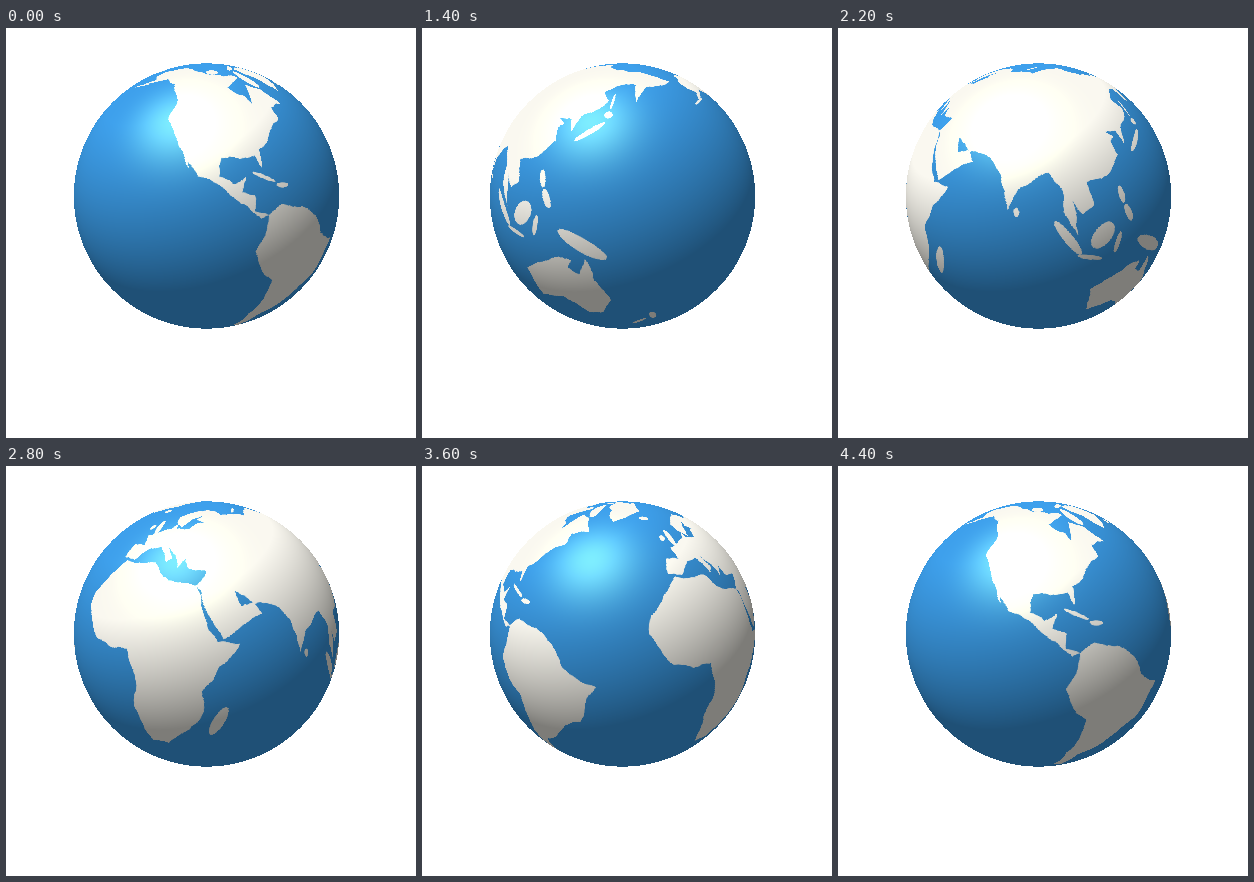
An HTML page with a canvas that plays this animation: 410 by 410 pixels, repeating every 4.5 s.

```html
<!DOCTYPE html>
<html lang="en">
<head>
<meta charset="utf-8">
<title>Turning globe</title>
<style>
html, body { margin: 0; width: 100%; height: 100%; overflow: hidden; background: #fff }
canvas { display: block }
</style>
</head>
<body>
<canvas id="stage" width="410" height="410"></canvas>
<script>
const RAD = Math.PI / 180;

// Flat map, four cells per degree; the land is slightly narrowed about longitude 0
const W = 1440, H = 720, NARROW = .97;
const mapX = lon => (lon * NARROW + 180) * 4;
const mapY = lat => (90 - lat) * 4;
const lands = new Path2D();

let seed = 7;
const random = () => (seed = seed * 16807 % 2147483647) / 2147483647;

// Rough line from a to b: each midpoint is pushed sideways a little
function shore(a, b, depth = 3) {
  if (!depth) return lands.lineTo(...b);
  const push = (random() - .5) * .16;
  const mid = [(a[0] + b[0]) / 2 + (b[1] - a[1]) * push, (a[1] + b[1]) / 2 - (b[0] - a[0]) * push];
  shore(a, mid, depth - 1);
  shore(mid, b, depth - 1);
}

// Capes and bays as longitude, latitude pairs
function continent(...keys) {
  const points = [];
  for (let i = 0; i < keys.length; i += 2) points.push([mapX(keys[i]), mapY(keys[i + 1])]);
  lands.moveTo(...points[0]);
  points.forEach((p, i) => shore(p, points[(i + 1) % points.length]));
  lands.closePath();
}

// Island as a tilted ellipse, sizes in degrees
function island(lon, lat, long, wide, angle) {
  const part = new Path2D();
  part.ellipse(mapX(lon), mapY(lat), long * 4, wide * 4, -angle * RAD, 0, 7);
  lands.addPath(part);
}

// North America
continent(-168,65.6, -156,71.3, -128,70, -96,68, -85,69.5, -81,68, -94,60, -82,55, -79,51.3,
  -78,59, -77.5,62.4, -65,60, -55.8,52.3, -66.5,50.2, -65,45, -70.5,42, -76,35, -81,31.7,
  -80.4,25.2, -83,29.5, -97.3,27.8, -97.5,21, -91.5,18.6, -87,21.5, -88.5,16, -83.3,15,
  -83,9.5, -77.4,8.3, -80.3,7.2, -86,11.5, -94,16, -105.5,20.5, -114,31.5, -109.5,23.1,
  -117,33, -124.2,40.3, -123.5,48.5, -135,58.5, -146,60.8, -164.5,54.7, -158,58.6, -165.5,61.5);
// South America
continent(-77.4,8.3, -72,12, -62,10.7, -51.5,4.2, -48.5,-1, -35.2,-6, -39,-14, -41,-22,
  -48.5,-26, -57,-36, -65,-41, -68,-51, -66,-55, -74,-52, -73,-38, -70.3,-18, -76,-14,
  -81.2,-5, -78,2);
// Europe and Asia
continent(-9,37, -8.8,43.2, -1.5,43.5, -4.7,48.4, 8,54, 10,57.5, 11,54.2, 20,55, 23.5,59.5,
  29,60, 21.4,61.5, 25,65.5, 17.5,61.5, 14,55.5, 8,58.1, 5.2,62, 14.5,68, 26,71.1, 41,67,
  35,64.5, 44,68, 68,68.5, 73,72, 104,77.6, 140,72.5, 180,69, 190,66, 179,62.5, 163,59.5,
  156.7,51, 156,61, 142,59.2, 135.3,54.7, 140.5,50, 129,41, 127.5,34.5, 125,39.6, 118,39,
  122,37, 119.5,35, 122,30, 116,23, 106,20, 109.2,12, 105,8.7, 100.5,13.5, 103.8,1.4,
  98.4,8.3, 97,16.5, 91,22.5, 80.3,15.5, 77.6,8.1, 72.8,20, 67,25, 57,25.8, 48.5,30,
  51.5,24.5, 56.3,26, 59.8,22.4, 45,12.8, 34.9,29, 32.5,30.5, 36,36.5, 27.5,36.8, 25,40.5,
  22.5,36.5, 19.4,41.5, 13,45.5, 18,40, 16,38, 9,44.4, 3,42.5, -2,36.8);
// Africa
continent(-5.9,35.8, -17,21, -17.4,14.7, -7.5,4.4, 9,4.2, 13.8,-10.5, 12,-18, 18.2,-34.4,
  26,-34, 35.5,-24, 40.5,-15, 39,-6.5, 51.3,11.5, 43,11.5, 37,20, 32.5,30.5, 20,31, 10.8,37);
// Australia
continent(114,-22, 131,-12.2, 136.8,-12.2, 135.5,-15.5, 140.5,-17.6, 142.5,-10.7, 146,-19,
  153.5,-28.5, 150,-37.5, 143,-39, 137,-34, 131,-31.5, 118,-35);
// Greenland
continent(-73,78, -32,83.5, -22,71, -43.5,60, -54,69);

island(46.8, -19, 7, 2.2, 72);        // Madagascar
island(80.8, 7.5, 1.5, .9, -80);      // Sri Lanka
island(100.5, -.2, 8, 1.6, -47);      // Sumatra
island(110, -7.3, 5, .8, -8);         // Java
island(114, 1, 5.5, 3.6, 50);         // Borneo
island(121, -2, 4, 1, 80);            // Sulawesi
island(141, -5.3, 10, 2.6, -22);      // New Guinea
island(121.5, 15.5, 3.2, 1.2, -70);   // Luzon
island(125, 8.8, 3.5, 1.4, -60);      // Mindanao
island(136.5, 35.5, 7, 1.1, 38);      // Honshu
island(143, 43.4, 2, 1.4, 0);         // Hokkaido
island(143, 50, 4, .6, 90);           // Sakhalin
island(176, -38.5, 3.5, 1.4, -50);    // New Zealand
island(170.5, -44, 4, 1.2, 45);
island(-2.5, 54, 4.5, 1.7, -65);      // Britain
island(-8, 53.2, 1.6, 1.5, 0);        // Ireland
island(-18.5, 65, 4, 1.3, 0);         // Iceland
island(-79.5, 21.8, 5, .6, -18);      // Cuba
island(-71.3, 19, 2.6, .8, 0);        // Hispaniola
island(-72, 68, 10, 3.5, -35);        // Baffin
island(-110, 71, 7, 2.2, 0);          // Victoria
island(-78, 79.5, 10, 2.5, 20);       // Ellesmere
island(59, 74, 5.5, 1, 35);           // Novaya Zemlya
island(-166, 53.7, 7, .4, 15);        // Aleutians

const map = new OffscreenCanvas(W, H).getContext('2d');
for (const shift of [0, -W]) {
  map.setTransform(1, 0, 0, 1, shift, 0);
  map.fill(lands);
  map.stroke(lands);
}
const cells = map.getImageData(0, 0, W, H).data;

// Every visible point of the sphere, seen in perspective
const CX = 200.5, CY = 168, R = 132.6, DIST = 4.4;
const ROLL = 5.7 * RAD, TILT = 14 * RAD;
const unit = v => v.map(c => c / Math.hypot(...v));
const dot = (a, b) => a[0] * b[0] + a[1] * b[1] + a[2] * b[2];
const LIGHT = unit([-.33, .78, .53]);
const HALF = unit([LIGHT[0], LIGHT[1], LIGHT[2] + 1]);
const OCEAN = [62, 160, 236], LAND = [250, 248, 240], SHINE = [65, 80, 35];

const ctx = document.getElementById('stage').getContext('2d');
const image = ctx.createImageData(410, 410);
image.data.fill(255);
const dots = [];
for (let py = 35; py < 302; py++) for (let px = 67; px < 334; px++) {
  const u = (px + .5 - CX) / R, v = (CY - py - .5) / R, rr = u * u + v * v;
  if (rr > 1) continue;
  const q = rr / (DIST * DIST - 1);
  const z = (q * DIST + Math.sqrt(1 - rr)) / (1 + q);
  const s = (DIST - z) / Math.sqrt(DIST * DIST - 1);
  const n = [u * s, v * s, z];
  const x = n[0] * Math.cos(ROLL) - n[1] * Math.sin(ROLL);
  const y = n[0] * Math.sin(ROLL) + n[1] * Math.cos(ROLL);
  const lat = Math.asin(y * Math.cos(TILT) + z * Math.sin(TILT)) / RAD;
  const lon = Math.atan2(x, z * Math.cos(TILT) - y * Math.sin(TILT)) / RAD;
  const facing = Math.max(0, dot(n, LIGHT));
  const shine = Math.max(0, dot(n, HALF)) ** 28;
  const lit = (base, diffuse) =>
    base.map((c, i) => c * Math.min(1, .5 + diffuse * facing) + SHINE[i] * shine);
  dots.push({
    at: (py * 410 + px) * 4,
    row: Math.floor((90 - lat) * 4) * W,
    col: (lon + 540) * 4,
    sea: lit(OCEAN, .55), soil: lit(LAND, .72)
  });
}

let shown = -1;
function draw() {
  const step = Math.floor(performance.now() / 100) % 45;
  if (step !== shown) {
    shown = step;
    const turn = (-98.5 - 8 * step + 360) * 4;
    for (const d of dots) {
      const a = cells[(d.row + Math.floor(d.col + turn) % W) * 4 + 3] / 255;
      for (let i = 0; i < 3; i++)
        image.data[d.at + i] = d.sea[i] + (d.soil[i] - d.sea[i]) * a;
    }
    ctx.putImageData(image, 0, 0);
  }
  requestAnimationFrame(draw);
}
draw();
</script>
</body>
</html>
```
